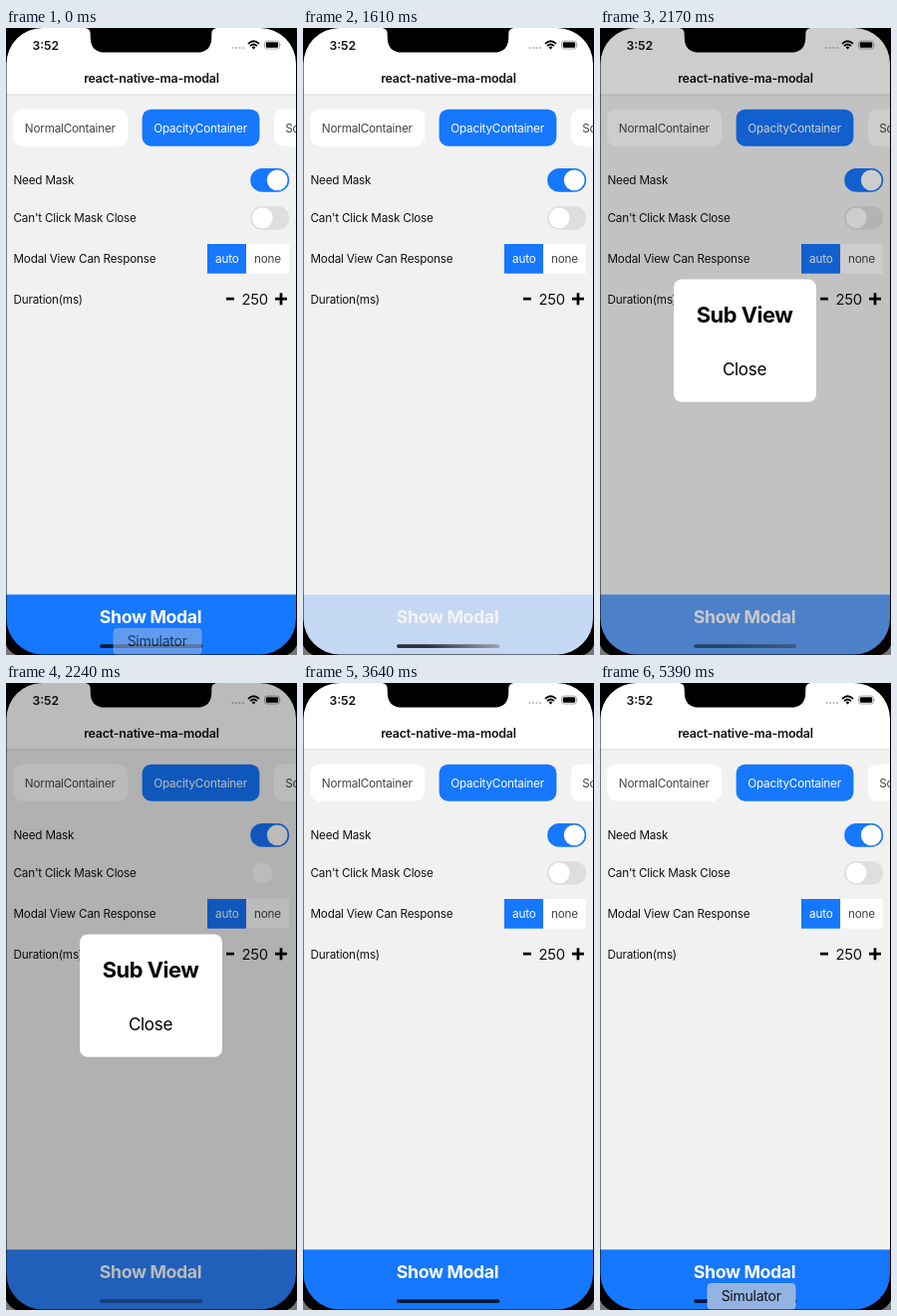
Write an HTML page that moves like this. It is 292 by 630 pixels and loops after 5880 ms.

```html
<!DOCTYPE html>
<html lang="en">
<head>
<meta charset="utf-8">
<title>Modal demo</title>
<style>
  html, body { margin: 0; width: 100%; height: 100%; overflow: hidden; background: #000; }
  svg { display: block; width: 292px; height: 630px; }
  text { font: 11.7px Inter, Roboto, sans-serif; letter-spacing: -.017em; fill: #111; }
  .mid { text-anchor: middle; }
  .grey { fill: #444; }
  .white { fill: #fff; }
  .blue { fill: #1677ff; }
  .title { font-size: 12.45px; font-weight: 600; }
  .clock { font-size: 12.2px; font-weight: 600; letter-spacing: 0; }
  .count { font-size: 14.8px; }
  .action { font-size: 17.7px; font-weight: 700; letter-spacing: -.02em; }
  .heading { font-size: 21.8px; font-weight: 700; letter-spacing: -.02em; fill: #000; }
  .close { font-size: 17px; fill: #000; }
  .tip { font-size: 14px; }
</style>
</head>
<body>
<svg viewBox="0 0 292 630">
  <defs>
    <linearGradient id="barFill">
      <stop offset=".3" stop-color="#000"/>
      <stop id="barEnd" offset="1" stop-color="#000"/>
    </linearGradient>
  </defs>
  <rect width="292" height="630" fill="#f1f1f1"/>

  <!-- header -->
  <rect class="white" width="292" height="67"/>
  <rect y="66.5" width="292" height="1" fill="#d8d8d8"/>
  <text class="clock" x="26.4" y="21.5">3:52</text>
  <text class="title mid" x="146" y="55">react-native-ma-modal</text>
  <g fill="#b8b8b8">
    <circle cx="227.5" cy="20" r="1.1"/><circle cx="231" cy="20" r="1.1"/>
    <circle cx="234.5" cy="20" r="1.1"/><circle cx="238" cy="20" r="1.1"/>
  </g>
  <g fill="none" stroke="#000" stroke-width="1.8">
    <path d="M243 15.8Q248.5 10.6 254 15.8M245 18.1Q248.5 14.9 252 18.1"/>
    <path d="M246.6 19.4Q248.5 17.8 250.4 19.4L248.5 21.4Z" fill="#000" stroke="none"/>
  </g>
  <rect x="259.5" y="13" width="15" height="8" rx="2.3" fill="none" stroke="#999" stroke-width=".8"/>
  <rect x="260.8" y="14.2" width="12.4" height="5.6" rx="1.2"/>
  <path d="M275.6 15.5q1.4 1.5 0 3Z" fill="#999"/>

  <!-- container tabs -->
  <rect class="white" x="7" y="81.7" width="115.3" height="37" rx="9"/>
  <rect class="blue" x="136.6" y="81.7" width="117.8" height="37" rx="9"/>
  <rect class="white" x="268.8" y="81.7" width="115" height="37" rx="9"/>
  <text class="mid grey" x="64.3" y="104.5">NormalContainer</text>
  <text class="mid white" x="195.1" y="104.5">OpacityContainer</text>
  <text class="grey" x="280.3" y="104.5">ScaleContainer</text>

  <!-- options -->
  <text x="7.5" y="157">Need Mask</text>
  <rect class="blue" x="245.2" y="141" width="39" height="23.7" rx="11.8"/>
  <circle class="white" cx="272.2" cy="152.8" r="10.4"/>

  <text x="7.5" y="195">Can't Click Mask Close</text>
  <rect id="offTrack" x="245.2" y="179" width="39" height="23.7" rx="11.8" fill="#dedede"/>
  <circle class="white" cx="257.2" cy="190.8" r="10.4"/>

  <text x="7.5" y="236">Modal View Can Response</text>
  <rect class="blue" x="202" y="217" width="39.2" height="29.7"/>
  <rect class="white" x="241.2" y="217" width="42.8" height="29.7"/>
  <text class="mid white" x="221.8" y="236">auto</text>
  <text class="mid grey" x="262.4" y="236">none</text>

  <text x="7.5" y="277">Duration(ms)</text>
  <path d="M221 272.2h8M270 272.2h12M276 266.2v12" stroke="#000" stroke-width="2.7"/>
  <text class="count mid" x="249.6" y="278.3">250</text>

  <!-- bottom button -->
  <g id="button">
    <rect class="blue" y="569.3" width="292" height="61"/>
    <text class="action mid white" x="145" y="598.3">Show Modal</text>
  </g>
  <rect id="homeBar" x="94" y="619.2" width="103.5" height="3.8" rx="1.9" fill="url(#barFill)"/>

  <!-- modal -->
  <rect id="mask" width="292" height="630"/>
  <g id="modal">
    <rect class="white" x="74" y="252.5" width="143" height="123.3" rx="8"/>
    <text class="heading mid" x="145" y="296">Sub View</text>
    <rect id="highlight" x="121.5" y="330.5" width="47.5" height="24.5" rx="2"/>
    <text class="close mid" x="145" y="349">Close</text>
  </g>

  <g id="tooltip">
    <rect x="108" y="603.5" width="88" height="25.8" rx="3.5" fill="#94b3e3" stroke="#a9c3ec" stroke-width=".8"/>
    <text class="tip mid" x="151.7" y="620.8">Simulator</text>
  </g>

  <!-- device edge, outer corners and notch -->
  <path fill-rule="evenodd" d="M0 0H292V630H0ZM.5 36V593.4A36 36 0 0 0 36.5 629.4H255A36 36 0 0 0 291 593.4V36A36 36 0 0 0 255 0H36.5A36 36 0 0 0 .5 36Z"/>
  <path d="M0 620Q3 627 10 630H0ZM292 620Q289 627 282 630H292Z" fill="#777"/>
  <path d="M78 0C83 0 84.7 2 84.7 7V9C84.7 20 90 24.6 100 24.6H191C201 24.6 206.3 20 206.3 9V7C206.3 2 208 0 213 0Z"/>
</svg>

<script>
  const LOOP = 5880, STEP = 70;
  const PRESS = 1610, OPEN = 2030, CLOSE_PRESS = 3200, CLOSED = 3640, TIP = 5390;
  const part = id => document.getElementById(id);
  const [button, homeBar, barEnd, mask, modal, highlight, tooltip, offTrack] =
    ['button', 'homeBar', 'barEnd', 'mask', 'modal', 'highlight', 'tooltip', 'offTrack'].map(part);

  const progress = (t, start, length) => Math.min(1, Math.max(0, (t - start) / length));
  const ease = p => p < .5 ? 2 * p * p : 1 - 2 * (1 - p) ** 2;
  const setOpacity = (element, value) => element.setAttribute('opacity', value);

  function draw(t) {
    const open = t >= OPEN && t < CLOSED;
    const shade = open ? ease(progress(t, 1955, 370)) : 0;
    const release = t < PRESS ? 1 : t < OPEN ? 0 : ease(progress(t, 1985, 340));
    const barGrey = Math.round(150 * (1 - release));

    setOpacity(button, .2 + .8 * release);
    setOpacity(homeBar, .78 - .48 * shade);
    barEnd.setAttribute('stop-color', `rgb(${barGrey},${barGrey},${barGrey})`);
    setOpacity(mask, .3 * shade);
    setOpacity(modal, open ? 1 : 0);
    setOpacity(highlight, .26 * ease(progress(t, CLOSE_PRESS, 290)));
    setOpacity(tooltip, t >= TIP ? 1 : t < STEP ? .6 : 0);
    setOpacity(offTrack, shade > .7 ? 0 : 1);
  }

  function tick() {
    const t = performance.now() % LOOP;
    draw(Math.floor(t / STEP) * STEP);
    requestAnimationFrame(tick);
  }
  tick();
</script>
</body>
</html>
```
